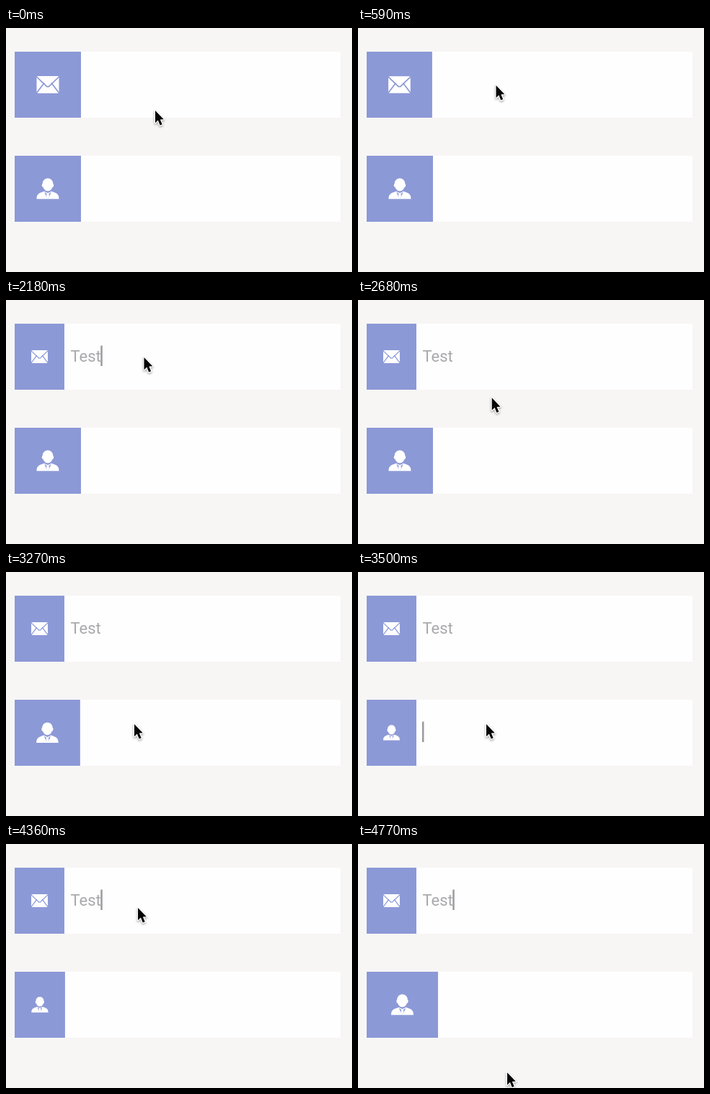
Animation of 480 by 340 pixels, one loop 4.81 s. Source, as an HTML page with a canvas:

```html
<!DOCTYPE html>
<html lang="en">
<head>
<meta charset="utf-8">
<title>Bouncy form fields</title>
<style>
  html, body { margin: 0; width: 100%; height: 100%; overflow: hidden; background: #f7f6f5; }
  canvas { display: block; width: 480px; height: 340px; }
</style>
</head>
<body>
<canvas id="stage" width="480" height="340"></canvas>
<script>
const ctx = document.getElementById('stage').getContext('2d');
const LOOP = 4810;
const PURPLE = '#8c99d7';
const FIELD = { x: 12, width: 452, height: 92 };
const TEXT_X = 89.5;
const WIDE = 92, NARROW = 69, STRETCHED = 99;

const clamp = v => Math.max(0, Math.min(1, v));
const progress = (t, start, end) => clamp((t - start) / (end - start));
const smooth = p => p * p * (3 - 2 * p);
const mix = (a, b, p) => a + (b - a) * p;

const pointerMoves = [
  { start: 10, end: 550, from: [207, 115], to: [191.5, 80] },
  { start: 2460, end: 2950, to: [178, 212] },
  { start: 3600, end: 4050, to: [183, 88.5] },
  { start: 4350, end: 4770, to: [207, 318.5] }
];

function pointerAt(t) {
  let [x, y] = pointerMoves[0].from;
  for (const move of pointerMoves) {
    const p = smooth(progress(t, move.start, move.end));
    x = mix(x, move.to[0], p);
    y = mix(y, move.to[1], p);
  }
  return [x, y];
}

const keyTimes = [1410, 1640, 1950, 2180];
const typedAt = t => 'Test'.slice(0, keyTimes.filter(k => t >= k).length);

function mailCaretAlpha(t) {
  if (t < 560) return 0;
  if (t < 1410) return 1 - progress(t, 1195, 1350);
  if (t < 4340) return 1 - progress(t, 2470, 2620);
  return 1;
}

function userCaretAlpha(t) {
  return t < 3240 ? 0 : 1 - progress(t, 3870, 4010);
}

const mailWidth = t => mix(WIDE, NARROW, smooth(progress(t, 550, 860)));

function userWidth(t) {
  const shrunk = mix(WIDE, NARROW, smooth(progress(t, 3235, 3500)));
  return mix(shrunk, STRETCHED, smooth(progress(t, 4315, 4760)));
}

function polyline(points) {
  ctx.beginPath();
  points.forEach(([x, y]) => ctx.lineTo(x, y));
}

function drawMail() {
  ctx.fillStyle = '#fff';
  ctx.beginPath();
  ctx.roundRect(-15.5, -12, 31, 24, 2);
  ctx.fill();
  ctx.strokeStyle = PURPLE;
  ctx.lineWidth = 1.7;
  polyline([[-15.5, -11], [-1.4, 2.6], [1.4, 2.6], [15.5, -11]]);
  ctx.stroke();
  for (const side of [-1, 1]) {
    polyline([[side * 15.5, 11.5], [side * 5, -2.5]]);
    ctx.stroke();
  }
}

function drawUser() {
  ctx.fillStyle = '#fff';
  ctx.beginPath();
  ctx.moveTo(-7.3, -7);
  ctx.bezierCurveTo(-7.3, -17, 7.3, -17, 7.3, -7);
  ctx.bezierCurveTo(9, -6, 8, -2, 6.4, -2);
  ctx.bezierCurveTo(4, 5, -4, 5, -6.4, -2);
  ctx.bezierCurveTo(-8, -2, -9, -6, -7.3, -7);
  ctx.fill();

  ctx.beginPath();
  ctx.moveTo(-15.5, 14.2);
  ctx.bezierCurveTo(-15.5, 7, -12, 6, -5, 3.5);
  ctx.lineTo(0, 6);
  ctx.lineTo(5, 3.5);
  ctx.bezierCurveTo(12, 6, 15.5, 7, 15.5, 14.2);
  ctx.closePath();
  ctx.fill();

  ctx.fillStyle = PURPLE;
  for (const side of [-1, 1]) {
    polyline([[side * 4.8, 4.2], [side * 1.4, 7], [side * 2, 10], [side * 0.6, 14.2]]);
    ctx.fill();
  }
}

function drawCaret(x, y, alpha) {
  ctx.globalAlpha = alpha;
  ctx.fillStyle = '#9c9a9f';
  ctx.fillRect(x - 0.5, y + 30.5, 2.5, 28.5);
  ctx.globalAlpha = 1;
}

function drawField(y, width, drawIcon, text, caretAlpha) {
  ctx.fillStyle = '#fffeff';
  ctx.fillRect(FIELD.x, y, FIELD.width, FIELD.height);

  ctx.font = '22px Roboto, sans-serif';
  ctx.fillStyle = '#a9a8aa';
  ctx.fillText(text, TEXT_X, y + 53);
  drawCaret(TEXT_X + ctx.measureText(text).width, y, caretAlpha);

  ctx.fillStyle = PURPLE;
  ctx.fillRect(FIELD.x, y, width, FIELD.height);
  const scale = mix(0.74, 1, clamp((width - NARROW) / (WIDE - NARROW)));
  ctx.save();
  ctx.translate(FIELD.x + width / 2, y + FIELD.height / 2);
  ctx.scale(scale, scale);
  drawIcon();
  ctx.restore();
}

function drawPointer([x, y]) {
  ctx.save();
  ctx.translate(x, y);
  polyline([[0, 0], [0, 17.2], [3.9, 13.6], [6.7, 20.6], [9.7, 19.3], [6.8, 12.6], [11.8, 12.3]]);
  ctx.closePath();
  ctx.lineJoin = 'round';
  ctx.lineWidth = 2.6;
  ctx.strokeStyle = '#fff';
  ctx.shadowColor = 'rgba(0, 0, 0, 0.35)';
  ctx.shadowBlur = 3;
  ctx.shadowOffsetY = 1.5;
  ctx.stroke();
  ctx.shadowColor = 'transparent';
  ctx.fillStyle = '#050505';
  ctx.fill();
  ctx.restore();
}

function draw(t) {
  ctx.fillStyle = '#f7f6f5';
  ctx.fillRect(0, 0, 480, 340);
  drawField(33, mailWidth(t), drawMail, typedAt(t), mailCaretAlpha(t));
  drawField(178, userWidth(t), drawUser, '', userCaretAlpha(t));
  drawPointer(pointerAt(t));
}

const startTime = performance.now();
function tick() {
  draw((performance.now() - startTime) % LOOP);
  requestAnimationFrame(tick);
}
tick();
</script>
</body>
</html>
```
